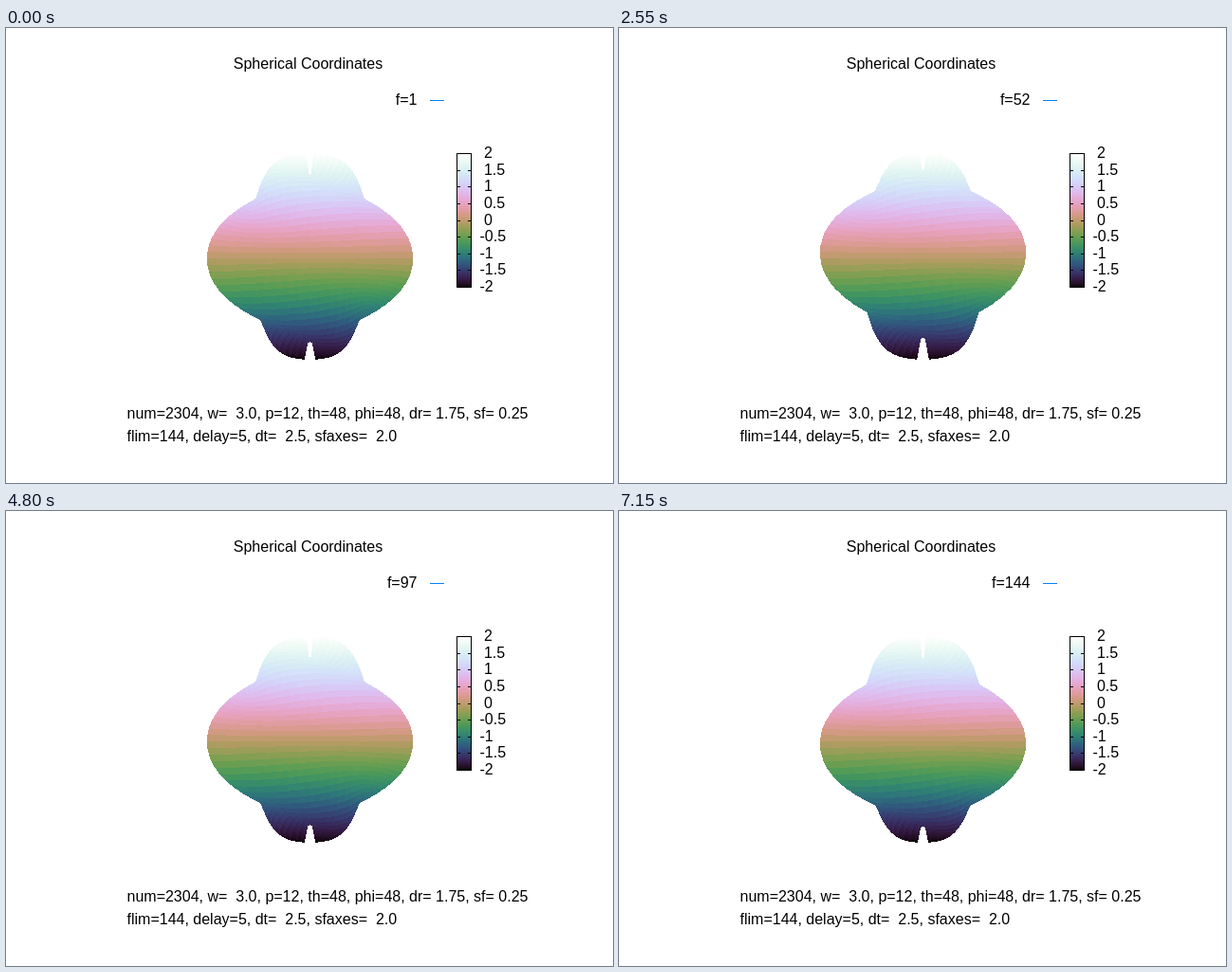
Animation, 640 px wide and 480 px high, one loop 7.2 s. Source, as an HTML page with a canvas:

```html
<!DOCTYPE html>
<html lang="en">
<head>
<meta charset="utf-8">
<title>Spherical Coordinates</title>
<style>
  html, body { margin: 0; width: 100%; height: 100%; overflow: hidden; background: #fff; }
  canvas, svg { position: absolute; left: 0; top: 0; width: 640px; height: 480px; }
  text { font: 16px "Liberation Sans", Arial, sans-serif; fill: #000; white-space: pre; }
</style>
</head>
<body>
<canvas id="stage" width="640" height="480"></canvas>
<svg id="labels" viewBox="0 0 640 480">
  <text x="318.5" y="43" text-anchor="middle">Spherical Coordinates</text>
  <text id="count" x="433.5" y="81" text-anchor="end">f=1</text>
  <path d="M447 76.5H462" stroke="#0080ff" shape-rendering="crispEdges"/>
  <text x="127.5" y="412">num=2304, w=  3.0, p=12, th=48, phi=48, dr= 1.75, sf= 0.25</text>
  <text x="127.5" y="436">flim=144, delay=5, dt=  2.5, sfaxes=  2.0</text>
</svg>
<script>
const ctx = document.getElementById('stage').getContext('2d');
const labels = document.getElementById('labels');
const count = document.getElementById('count');
const N = 48, FRAMES = 144, DELAY = 50;
const RADIUS = 1.75, AMP = 0.25, SCALE = 54.5, CX = 320.5, CY = 241;
const THETA_STEP = 3.72, PHI_STEP = 360 / N;
const RAD = Math.PI / 180;

// Cubehelix palette with gamma 1.5, v from 0 (dark) to 1 (white)
function helix(v) {
  const a = 2 * Math.PI * (0.5 / 3 - 1.5 * v);
  const g = v ** (1 / 1.5), amp = g * (1 - g) / 2;
  const c = Math.cos(a), s = Math.sin(a);
  const byte = k => Math.round(255 * Math.min(1, Math.max(0, g + amp * k)));
  return `rgb(${byte(-0.14861 * c + 1.78277 * s)},${byte(-0.29227 * c - 0.90649 * s)},${byte(1.97294 * c)})`;
}
const palette = Array.from({ length: 257 }, (_, i) => helix(i / 256));
const colour = z => palette[Math.round(Math.min(1, Math.max(0, (z + 2) / 4)) * 256)];

// A spiral wave swells and shrinks the radius of the sphere
function vertex(i, j, f) {
  const theta = (i + 0.5) * THETA_STEP, phi = j * PHI_STEP;
  const phase = 4 * theta + 2 * phi + 7.5 * f - 376;
  const r = RADIUS + AMP * Math.cos(phase * RAD);
  const ring = r * Math.sin(theta * RAD), z = r * Math.cos(theta * RAD);
  return {
    x: CX + SCALE * ring * Math.cos(phi * RAD),
    y: CY - SCALE * z,
    z,
    depth: ring * Math.sin(phi * RAD)
  };
}

// Row by row fill, so the edges stay hard
function fillQuad(q) {
  const ys = q.map(p => p.y);
  const last = Math.round(Math.max(...ys));
  for (let y = Math.round(Math.min(...ys)); y < last; y++) {
    const mid = y + 0.5;
    let left = Infinity, right = -Infinity;
    for (let k = 0; k < 4; k++) {
      const a = q[k], b = q[(k + 1) % 4];
      if ((a.y <= mid) === (b.y <= mid)) continue;
      const x = a.x + (b.x - a.x) * (mid - a.y) / (b.y - a.y);
      left = Math.min(left, x);
      right = Math.max(right, x);
    }
    const x0 = Math.round(left), x1 = Math.round(right);
    if (x1 > x0) ctx.fillRect(x0, y, x1 - x0, 1);
  }
}

function drawSurface(f) {
  const grid = [];
  for (let i = 0; i < N; i++) {
    grid.push(Array.from({ length: N }, (_, j) => vertex(i, j, f)));
  }
  const quads = [];
  for (let i = 0; i < N - 1; i++) {
    for (let j = 0; j < N; j++) {
      const k = (j + 1) % N;
      const pts = [grid[i][j], grid[i][k], grid[i + 1][k], grid[i + 1][j]];
      const mean = key => pts.reduce((sum, p) => sum + p[key], 0) / 4;
      quads.push({ pts, z: mean('z'), depth: mean('depth') });
    }
  }
  quads.sort((a, b) => a.depth - b.depth);
  ctx.clearRect(200, 120, 240, 240);
  for (const q of quads) {
    ctx.fillStyle = colour(q.z);
    fillQuad(q.pts);
  }
}

function drawColourBar() {
  const top = 132, height = 141;
  for (let y = 0; y < height; y++) {
    ctx.fillStyle = helix(1 - y / height);
    ctx.fillRect(475, top + y, 16, 1);
  }
  ctx.strokeStyle = ctx.fillStyle = '#000';
  ctx.strokeRect(475.5, top + 0.5, 15, height);
  for (let i = 0; i <= 8; i++) {
    const value = 2 - i / 2, y = Math.round(top + i * height / 8);
    ctx.fillRect(475, y, 4, 1);
    ctx.fillRect(487, y, 4, 1);
    const text = document.createElementNS('http://www.w3.org/2000/svg', 'text');
    text.setAttribute('x', 499.5);
    text.setAttribute('y', y + 5);
    text.textContent = (value < 0 ? '' : ' ') + value;
    labels.append(text);
  }
}

let shown = 0;
function tick(now) {
  const f = Math.floor(now / DELAY) % FRAMES + 1;
  if (f !== shown) {
    shown = f;
    count.textContent = 'f=' + f;
    drawSurface(f);
  }
  requestAnimationFrame(tick);
}

drawColourBar();
tick(0);
</script>
</body>
</html>
```
